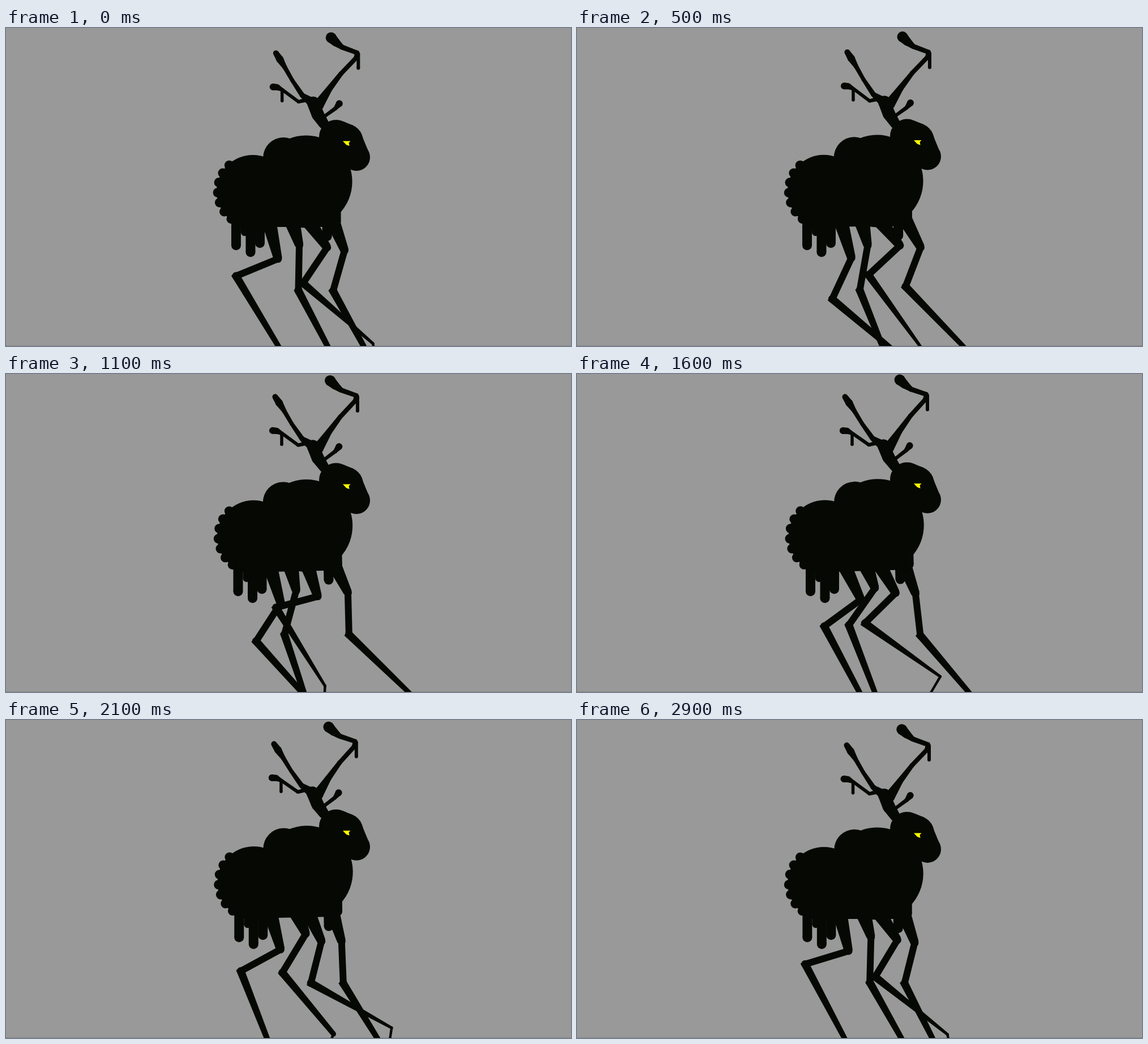
Animation of 998x561 px, one loop 3000 ms. Source, as an HTML page with a canvas:

```html
<!DOCTYPE html>
<html lang="en">
<head>
<meta charset="utf-8">
<title>Walking creature</title>
<style>
  html, body { margin: 0; width: 100%; height: 100%; overflow: hidden; background: #999; }
  canvas { display: block; }
</style>
</head>
<body>
<canvas id="stage" width="998" height="561"></canvas>
<script>
const ctx = document.getElementById('stage').getContext('2d');
const W = 998, H = 561, LOOP = 3000, INK = '#060903';
const BEAT = 600, STEPS = [0, 100, 150, 250, 300, 400, 450, 500];
const FIRST_KEY = 500;

// Rigid legs: bone lengths are thigh, shank, foot bone. Each joint swings
// through angles in degrees from straight down, one key per beat.
const LEGS = [
  { hip: [457, 310], hipWidth: 31, footWidth: 9, lengths: [100, 80, 160],
    thigh: [16, 16, 26, 11, 13], shank: [-25, -33, -57, -63, -73], foot: [50, 42, 26, 21, 28] },
  { hip: [493, 300], hipWidth: 40, footWidth: 9, lengths: [87, 80, 141],
    thigh: [13.5, 12.5, 23, 23.5, 17.5], shank: [-10, -15, -37, -25, -1.5], foot: [22, 18.5, 23, 45, 29.5] },
  { hip: [530, 335], hipWidth: 27, footWidth: 5, lengths: [64, 76, 163],
    thigh: [39, 18, 31, 22, 34], shank: [-47, -75, -39, -8, -31], foot: [36, 32, 58, 60, 51.5] },
  { hip: [569, 320], hipWidth: 29, footWidth: 8, lengths: [78, 74, 165],
    thigh: [29, 26, 20, 16.5, 20.5], shank: [-21, 1.5, 6.5, -1, -14], foot: [44, 46, 39, 29, 27] }
];

// Swells from 0 to 1 and back once per loop.
const wave = (t, peak) => (1 + Math.cos((t - peak) / LOOP * 2 * Math.PI)) / 2;

const lift = t => -6.2 * wave(t, 1530);
const shift = t => 2.2 * wave(t, 1700);
const sway = t => 6.6 * wave(t, 1750);
const turn = t => -.034 * wave(t, 1880);

// Smooth cyclic curve through evenly spaced keys.
function swing(keys, t) {
  const n = keys.length;
  const s = ((t - FIRST_KEY + LOOP) % LOOP) / LOOP * n;
  const i = Math.floor(s), u = s - i;
  const [a, b, c, d] = [-1, 0, 1, 2].map(k => keys[(i + k + n) % n]);
  return b + u / 2 * (c - a + u * (2 * a - 5 * b + 4 * c - d + u * (3 * (b - c) + d - a)));
}

function dot(x, y, r) {
  ctx.beginPath();
  ctx.arc(x, y, r, 0, Math.PI * 2);
  ctx.fill();
}

function polygon(points) {
  ctx.beginPath();
  points.forEach(p => ctx.lineTo(...p));
  ctx.closePath();
  ctx.fill();
}

function bone([x1, y1], [x2, y2], w1, w2) {
  const len = Math.hypot(x2 - x1, y2 - y1) || 1;
  const nx = (y1 - y2) / len / 2, ny = (x2 - x1) / len / 2;
  polygon([
    [x1 + nx * w1, y1 + ny * w1], [x2 + nx * w2, y2 + ny * w2],
    [x2 - nx * w2, y2 - ny * w2], [x1 - nx * w1, y1 - ny * w1]]);
}

// Rounded chain of [x, y, width] points.
function limb(...points) {
  points.forEach((p, i) => {
    dot(p[0], p[1], p[2] / 2);
    if (i) bone(points[i - 1], p, points[i - 1][2], p[2]);
  });
}

function drip(x, top, bottom, width) {
  limb([x, top, width], [x, bottom - width / 2, width]);
}

function joints(leg, t) {
  const [hx, hy] = leg.hip;
  const chain = [[hx + shift(t) / 2, hy + lift(t) * (hx - 380) / 215]];
  [leg.thigh, leg.shank, leg.foot].forEach((keys, i) => {
    const angle = swing(keys, t) * Math.PI / 180;
    const [x, y] = chain[i];
    chain.push([x + leg.lengths[i] * Math.sin(angle), y + leg.lengths[i] * Math.cos(angle)]);
  });
  return chain;
}

function drawLeg(leg, t) {
  const [hip, knee, hock, foot] = joints(leg, t);
  bone(hip, knee, leg.hipWidth, 15);
  dot(...knee, 7);
  bone(knee, hock, 12, 12);
  dot(...hock, 7);
  // The heel sticks out a little behind the hock.
  const heel = hock.map((v, i) => v - (foot[i] - v) * .03);
  bone(heel, foot, 14, leg.footWidth);
  dot(...foot, leg.footWidth / 2);
  // The toe drags behind the moving foot.
  const drag = (joints(leg, t - 80)[3][0] - foot[0]) * .043;
  bone(foot, [foot[0] + drag * 40, foot[1] + 40], 4.5, 4);
}

// Runs a drawing with the canvas turned about a pivot and moved.
function posed(x, y, angle, dx, dy, paint) {
  ctx.save();
  ctx.translate(x + dx, y + dy);
  ctx.rotate(angle);
  ctx.translate(-x, -y);
  paint();
  ctx.restore();
}

function drawTorso() {
  dot(530, 271, 81.5);
  dot(490, 229, 36);
  dot(436, 288, 64);
  ctx.fillRect(412, 290, 165, 61);
  for (let i = 0; i < 7; i++) {
    const angle = (128 + i * 16.6) * Math.PI / 180;
    dot(436 + 62 * Math.cos(angle), 288 + 62 * Math.sin(angle), 8.5);
  }
  drip(583, 310, 350, 17);
  drip(567, 330, 376, 17);
}

function drawAntlers() {
  limb([543, 132, 22], [551, 153, 22], [562, 170, 18]);
  limb([477.5, 44, 10], [484.5, 55, 13], [493, 69, 8], [506, 92, 7], [524, 119, 9], [543, 133, 18]);
  limb([472, 103.5, 12], [479, 104, 11], [489, 109, 6], [517, 130, 6], [533, 126, 8]);
  limb([575, 17, 19], [583, 25, 15], [594, 34, 9], [621, 44, 8], [619, 53, 8],
    [592, 81, 8], [571, 108, 11], [552, 136, 19]);
  limb([589, 133.5, 12], [582, 142, 7], [564, 155, 6]);
}

function draw(t) {
  const up = lift(t), tilt = turn(t);
  ctx.fillStyle = '#999';
  ctx.fillRect(0, 0, W, H);
  ctx.fillStyle = '#858585';
  ctx.fillRect(0, H - 1, W, 1);

  ctx.fillStyle = INK;
  LEGS.forEach(leg => drawLeg(leg, t));
  [[406, 392], [431.5, 404], [448, 388]].forEach(([x, bottom]) => drip(x + sway(t), 335, bottom, 17));
  drip(421 + sway(t), 335, 367, 13);

  posed(380, 300, up / 215, shift(t), 0, drawTorso);
  posed(555, 175, tilt, 0, up, drawAntlers);
  // Hanging drops stay upright while the antlers turn.
  [[488, 110, 131, 5.5], [623, 46, 74, 6]].forEach(([x, top, bottom, width]) => {
    const dx = (175 - top) * tilt, dy = (x - 555) * tilt + up;
    drip(x + dx, top + dy, bottom + dy, width);
  });

  posed(0, 0, 0, 0, up, () => {
    limb([583, 192, 60], [600, 200, 62], [619, 228, 48]);
    ctx.fillStyle = '#ff0';
    polygon([[595, 199.5], [608.5, 199.5], [605.5, 202.5], [606.5, 208], [601, 206]]);
  });
}

const start = performance.now();
function tick() {
  const t = (performance.now() - start) % LOOP;
  const within = t % BEAT;
  draw(t - within + STEPS.filter(s => s <= within).pop());
  requestAnimationFrame(tick);
}
tick();
</script>
</body>
</html>
```
